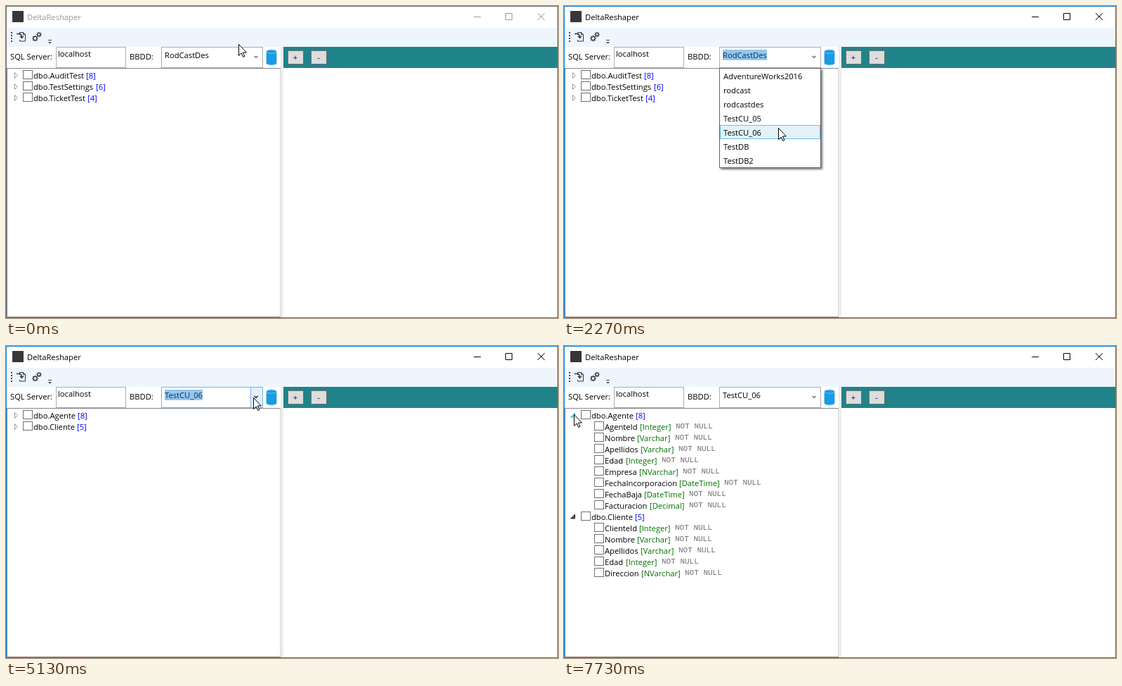
Write an HTML page with a canvas that moves like this. It is 786 px wide and 443 px high and loops after 8 s.

```html
<!DOCTYPE html>
<html lang="en">
<head>
<meta charset="utf-8">
<title>Database table picker</title>
<style>
html, body { margin: 0; width: 786px; height: 443px; overflow: hidden; background: #fff; }
canvas { display: block; }
</style>
</head>
<body>
<canvas id="stage" width="786" height="443"></canvas>
<script>
const ctx = document.getElementById('stage').getContext('2d');
const LOOP = 8000, TICK = 1000 / 15;
const UI = '11.2px "Open Sans", "Noto Sans", sans-serif';
const MONO = '11px "Liberation Mono", monospace';

// Moments that change the interface, in ticks
const ACTIVATE = 14, SELECT = 15, OPEN = 16, PICK = 48, LOADED = 55,
      EXPAND_CLIENT = 97, EXPAND_AGENT = 116;

// Pointer path: tick, x, y
const PATH = [
  [0, 331, 54], [2, 337, 56], [3, 337, 56], [4, 356, 72], [18, 356, 72],
  [22, 345, 90], [25, 329, 109], [31, 306, 154], [32, 306, 153], [33, 306, 153],
  [36, 304, 212], [38, 303, 173], [62, 303, 173], [74, 354, 72], [75, 354, 72],
  [76, 350, 74], [77, 352, 73], [81, 352, 73], [90, 60, 142], [94, 16, 125],
  [95, 14, 113], [102, 14, 113], [106, 13, 94], [111, 13, 94], [113, 14, 97], [120, 14, 97]
];

const DATABASES = ['AdventureWorks2016', 'rodcast', 'rodcastdes', 'TestCU_05', 'TestCU_06', 'TestDB', 'TestDB2'];
const FIRST_TABLES = [['dbo.AuditTest', 8], ['dbo.TestSettings', 6], ['dbo.TicketTest', 4]];
const AGENT = ['AgenteId Integer', 'Nombre Varchar', 'Apellidos Varchar', 'Edad Integer', 'Empresa NVarchar',
  'FechaIncorporacion DateTime', 'FechaBaja DateTime', 'Facturacion Decimal'];
const CLIENT = ['ClienteId Integer', 'Nombre Varchar', 'Apellidos Varchar', 'Edad Integer', 'Direccion NVarchar'];

function fill(x, y, w, h, color) {
  ctx.fillStyle = color;
  ctx.fillRect(x, y, w, h);
}

function box(x, y, w, h, border, color) {
  if (color) fill(x, y, w, h, color);
  ctx.strokeStyle = border;
  ctx.lineWidth = 1;
  ctx.strokeRect(x + .5, y + .5, w - 1, h - 1);
}

// Draws text and returns the whole pixel where it ends
function text(str, x, y, color = '#000', font = UI) {
  ctx.font = font;
  ctx.fillStyle = color;
  ctx.fillText(str, x, y);
  return Math.ceil(x + ctx.measureText(str).width);
}

function shape(d, x, y, stroke, color, width = 1) {
  const path = new Path2D(d);
  ctx.save();
  ctx.translate(x, y);
  if (color) { ctx.fillStyle = color; ctx.fill(path); }
  if (stroke) { ctx.strokeStyle = stroke; ctx.lineWidth = width; ctx.stroke(path); }
  ctx.restore();
}

function pointerAt(n) {
  const i = Math.max(1, PATH.findIndex(k => k[0] >= n));
  const [a, ax, ay] = PATH[i - 1], [b, bx, by] = PATH[i];
  const p = (n - a) / (b - a);
  return [Math.round(ax + (bx - ax) * p), Math.round(ay + (by - ay) * p)];
}

function gear(x, y, r) {
  ctx.strokeStyle = '#333';
  ctx.lineWidth = 1.2;
  ctx.beginPath();
  ctx.arc(x, y, r, 0, 7);
  ctx.stroke();
  for (let i = 0; i < 8; i++) {
    const c = Math.cos(i * Math.PI / 4), s = Math.sin(i * Math.PI / 4);
    ctx.beginPath();
    ctx.moveTo(x + c * r, y + s * r);
    ctx.lineTo(x + c * (r + 1.8), y + s * (r + 1.8));
    ctx.stroke();
  }
}

function drawWindow(active) {
  fill(0, 0, 786, 443, '#fff');
  fill(9, 7, 16, 16, '#38363b');
  const ink = active ? '#000' : '#999';
  text('DeltaReshaper', 30, 20, ink);
  shape('M666 15.5h10M711.5 10.5h9v9h-9zM757 10l10 10M767 10l-10 10', 0, 0, ink);

  // Toolbar
  fill(1, 31, 784, 27, '#eef5fd');
  for (let y = 37; y < 50; y += 4) fill(7, y, 2, 2, '#444');
  shape('M19.5 41v-3.5h5l3 3v9.5h-8v-2M24.5 37.5v3h3', 0, 0, '#333');
  shape('M15 39.5h4q3.5 0 3.5 5M20 42.5l2.5 3 2.5-3', 0, 0, '#1c3f66', null, 1.4);
  gear(41.5, 46, 2.6);
  gear(47, 40.5, 2);
  fill(60, 48, 5, 1, '#444');
  shape('M60 51h5l-2.5 2.5z', 0, 0, null, '#444');

  // Right side
  fill(391, 58, 4, 384, '#eee');
  fill(395, 58, 390, 30, '#21838a');
  for (const [x, sign] of [[401, '+'], [434, '-']]) {
    box(x, 63, 23, 20, '#707070', '#ddd');
    ctx.textAlign = 'center';
    text(sign, x + 11, 77, '#00004d');
    ctx.textAlign = 'left';
  }
}

function drawConnection(n, hover) {
  text('SQL Server:', 6, 76);
  box(71, 58, 100, 30, '#abadb3');
  text('localhost', 74, 72);
  text('BBDD:', 176, 76);

  box(221, 58, 145, 30, hover ? '#7eb4ea' : '#acacac');
  if (hover) box(348, 58, 18, 30, '#7eb4ea', '#e3f0fb');
  shape('M353.5 71l2.5 2.5 2.5-2.5', 0, 0, hover ? '#000' : '#606060', null, 1.2);
  const end = text(n < PICK ? 'RodCastDes' : 'TestCU_06', 226, 74);
  if (n >= SELECT && n < EXPAND_CLIENT) fill(226, 62, end - 226, 15, 'rgba(0,120,215,.42)');

  // Database icon with a pale rim
  shape('M370.5 65v16c0 4 15 4 15 0v-16c0-4-15-4-15 0z', 0, 0, '#a5dcf8', '#1a9be3');
  shape('M371 65c0 3 14 3 14 0', 0, 0, '#6cc5f2');
}

function expander(y, open, hover) {
  if (open) shape('M15.5 -3.5v6h-6z', 0, y, hover ? '#1cc4f7' : '#262626', hover ? '#82dffb' : '#595959');
  else shape('M12.5 -4v8l4-4z', 0, y, hover ? '#27c7f7' : '#989898', hover ? '#cceefb' : '#fff');
}

function checkbox(x, y) {
  box(x, y - 7, 14, 13, '#707070', '#fff');
}

function drawTree(n) {
  box(1, 88, 390, 354, '#828790');
  fill(390, 89, 1, 352, '#d5d8dc');
  const hoverRow = n >= 112 ? 0 : n >= 95 && n <= 103 ? 1 : -1;
  const tables = n < PICK ? FIRST_TABLES : n < LOADED ? [] : [
    ['dbo.Agente', 8, n >= EXPAND_AGENT && AGENT],
    ['dbo.Cliente', 5, n >= EXPAND_CLIENT && CLIENT]
  ];
  let y = 98;
  tables.forEach(([name, count, columns], i) => {
    expander(y + .5, columns, i === hoverRow);
    checkbox(24, y);
    text(`[${count}]`, text(name + ' ', 39, y + 5), y + 5, '#00f');
    y += 16;
    for (const column of columns || []) {
      const [field, type] = column.split(' ');
      checkbox(43, y);
      const end = text(`[${type}]`, text(field + ' ', 58, y + 5), y + 5, '#007000');
      text('NOT NULL', end + 6, y + 3, '#707070', MONO);
      y += 16;
    }
  });
}

function drawPopup(n, y) {
  if (n < OPEN || n >= PICK) return;
  const height = n === OPEN ? 72 : 142;
  ctx.save();
  ctx.beginPath();
  ctx.rect(221, 88, 150, height + 4);
  ctx.clip();
  ctx.shadowColor = 'rgba(0,0,0,.55)';
  ctx.shadowBlur = 3;
  ctx.shadowOffsetX = ctx.shadowOffsetY = 2;
  fill(221, 88, 145, height, '#fff');
  ctx.shadowColor = 'transparent';
  box(221, 88, 145, height, '#646464');
  ctx.beginPath();
  ctx.rect(222, 89, 143, height - 2);
  ctx.clip();
  const hot = Math.floor((y - 90) / 20);
  DATABASES.forEach((name, i) => {
    if (i === hot) box(222, 89 + 20 * i, 143, 20, '#70c0e7', '#e3f2fa');
    text(name, 227, 104 + 20 * i);
  });
  ctx.restore();
}

function draw(now) {
  const n = Math.floor((now % LOOP + 3.4) / TICK) % 120;
  const [x, y] = pointerAt(n);
  const active = n >= ACTIVATE;
  drawWindow(active);
  drawTree(n);
  drawConnection(n, x >= 221 && x < 366 && y >= 58 && y < 88);
  box(0, 0, 786, 443, active ? '#1883d7' : '#707070');
  drawPopup(n, y);
  shape('M.5 .5v16l3.7-3.5 2.5 5.5 2.2-1-2.5-5.5h5z', x, y, '#000', '#fff');
  requestAnimationFrame(draw);
}
requestAnimationFrame(draw);
</script>
</body>
</html>
```
